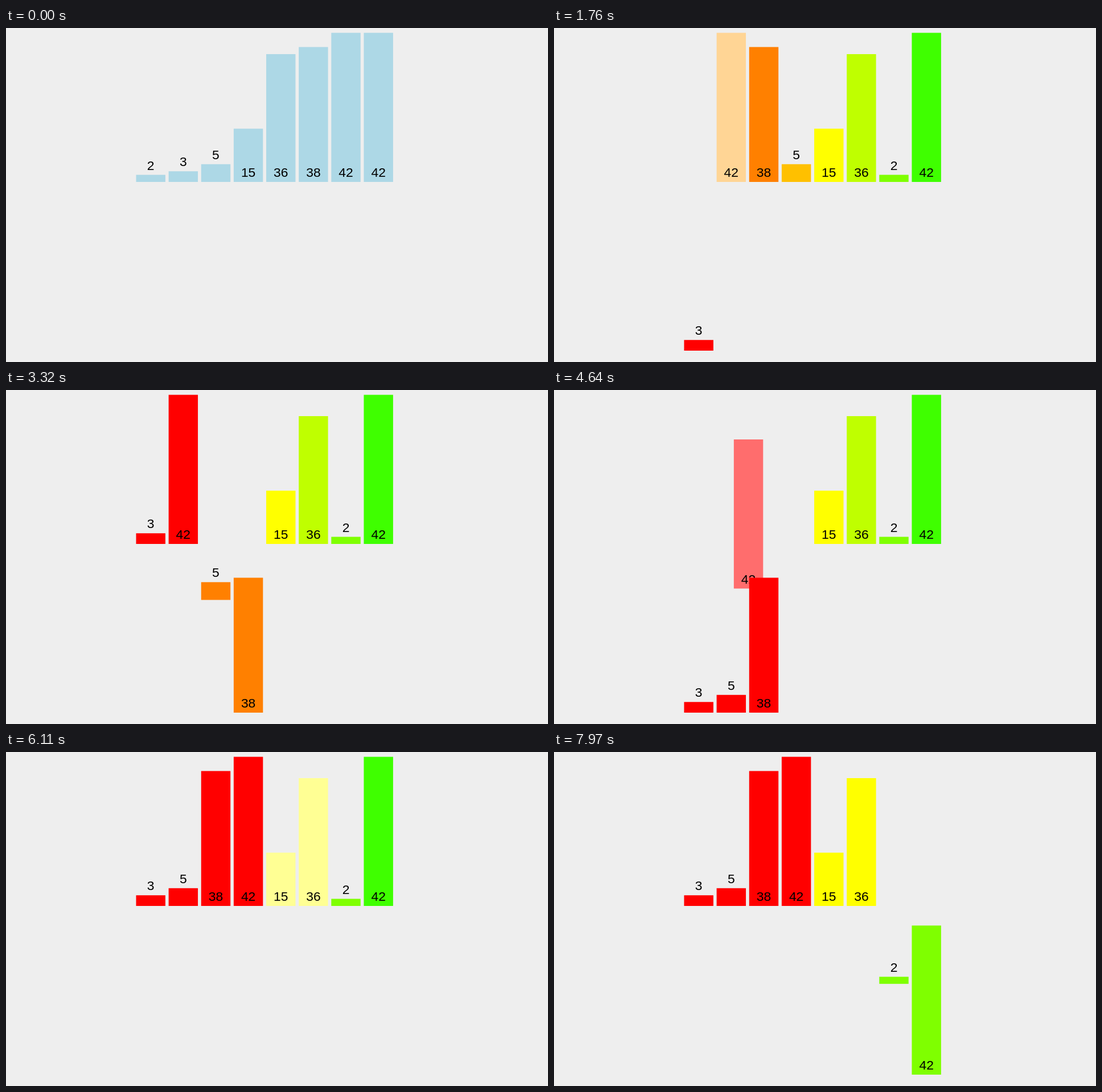
Write an HTML page that moves like this. It is 952 by 588 pixels and loops after 8000 ms.

```html
<!DOCTYPE html>
<html lang="en">
<head>
<meta charset="utf-8">
<title>Merge sort</title>
<style>
  html, body { margin: 0; width: 100%; height: 100%; overflow: hidden; background: #eee; }
  svg { display: block; width: 952px; height: 588px; }
  text { font: 22.9px "Liberation Sans", Arial, sans-serif; text-anchor: middle; fill: #000; }
</style>
</head>
<body>
<svg id="stage" viewBox="0 0 952 588"></svg>
<script>
const LOOP = 8000, STEP = 230, FADE = 205;
const LEFT = 228.5, PITCH = 57.14, WIDTH = 51.43, UNIT = 6.25;
const BASE = 271, DROP = 297;
const BLUE = [173, 216, 230];
const values = [3, 42, 38, 5, 15, 36, 2, 42];
const sortedCols = [1, 6, 5, 2, 3, 4, 0, 7];

const stage = document.getElementById('stage');
const add = (tag, parent) =>
  parent.appendChild(document.createElementNS('http://www.w3.org/2000/svg', tag));

// Hues 0..105 degrees in steps of 15
const rainbow = i => i <= 4 ? [255, Math.min(255, i * 64), 0] : [255 - (i - 4) * 64, 255, 0];
const pale = c => c.map(v => v + (255 - v) * 0.58);

const bars = values.map((value, i) => {
  const g = add('g', stage), rect = add('rect', g), label = add('text', g);
  const height = value * UNIT;
  rect.setAttribute('width', WIDTH);
  rect.setAttribute('height', height);
  rect.setAttribute('y', BASE - height);
  label.setAttribute('x', WIDTH / 2);
  label.setAttribute('y', value < 10 ? BASE - height - 8.8 : BASE - 9);
  label.textContent = value;
  return {
    g, rect,
    start: { pos: [sortedCols[i], 0], color: BLUE },
    moves: { pos: [], color: [] }
  };
});

const change = (id, prop, to, at, length = STEP) =>
  bars[id].moves[prop].push({ to, at, length });
const tint = (ids, color, at, length = FADE) =>
  ids.forEach(id => change(id, 'color', color, at, length));

// Copy bars down in sorted order, then back up; times holds the start of each copy
function merge(ids, firstCol, times) {
  const n = ids.length;
  times.forEach((at, k) => {
    const id = ids[k % n], down = k < n;
    const gap = k + 1 < times.length ? times[k + 1] - at : STEP;
    const length = Math.min(STEP, gap);
    change(id, 'pos', [firstCol + k % n, down ? 1 : 0], at, length);
    if (down) change(id, 'color', rainbow(firstCol), at, length);
  });
}

bars.forEach((bar, i) => {
  change(i, 'pos', [i, 0], 482, 350);
  change(i, 'color', rainbow(i), 995);
});

tint([0, 1], [255, 213, 149], 1267);
merge([0, 1], 0, [1530, 1800, 2050, 2305]);

tint([2, 3], pale(rainbow(2)), 2555);
merge([3, 2], 2, [2765, 2978, 3193, 3420]);

const paleRed = pale(rainbow(0));
tint([0, 3, 2], paleRed, 3660);
tint([1], paleRed, 4020);
merge([0, 3, 2, 1], 0, [4020, 4196, 4372, 4548, 4825, 5095, 5365, 5635]);

tint([4, 5], pale(rainbow(4)), 5905);
merge([4, 5], 4, [6205, 6412, 6620, 6827]);

tint([6, 7], pale(rainbow(6)), 7038);
merge([6, 7], 6, [7290, 7570, 7853]);

const ease = t => t < 0.5 ? 4 * t ** 3 : 1 - 4 * (1 - t) ** 3;

function valueAt(start, moves, now) {
  let v = start;
  for (const { to, at, length } of moves) {
    if (now <= at) break;
    const k = ease(Math.min(1, (now - at) / length));
    v = v.map((a, i) => a + (to[i] - a) * k);
  }
  return v;
}

function draw(now) {
  for (const { g, rect, start, moves } of bars) {
    const [col, low] = valueAt(start.pos, moves.pos, now);
    const color = valueAt(start.color, moves.color, now).map(Math.round);
    g.setAttribute('transform', `translate(${LEFT + col * PITCH} ${low * DROP})`);
    rect.setAttribute('fill', `rgb(${color})`);
  }
}

const began = performance.now();
function tick() {
  draw((performance.now() - began) % LOOP);
  requestAnimationFrame(tick);
}
draw(0);
requestAnimationFrame(tick);
</script>
</body>
</html>
```
